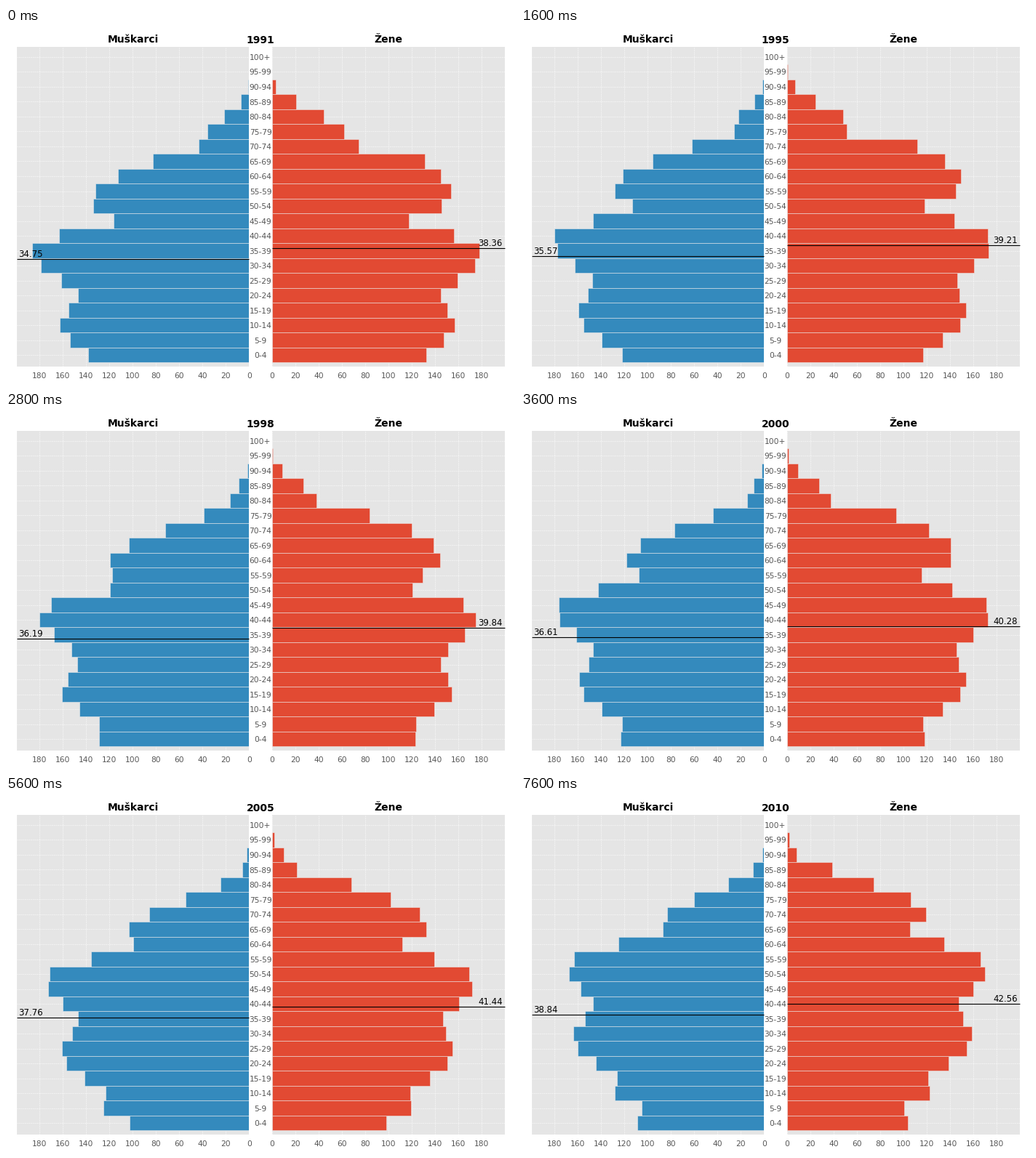
These frames come from a looping animation (700 px wide and 490 px high, 8000 ms). A matplotlib script:

```python
import matplotlib.pyplot as plt
import numpy as np
from matplotlib.animation import FuncAnimation
from matplotlib.patches import Rectangle

WIDTH, HEIGHT, DPI = 700, 490, 100
FIRST_YEAR, YEAR_COUNT, INTERVAL = 1991, 20, 400
TOP, BOTTOM, SPAN = 26, 466, 319.7
BASE, ROW, GROUPS = 460.25, 20.5, 21   # lower edge of the youngest group, group height
UNIT = 1.6                             # pixels per thousand people
THIN = 0.36
LABEL_COLOR = "#555555"

# Size of a birth cohort in pixels: turning points of the birth curve.
BIRTHS = np.array([
    (1893, 10), (1898.5, 49), (1903.5, 122), (1912, 166), (1917, 112), (1920.5, 203),
    (1923.5, 240), (1933, 259), (1938.5, 239), (1943, 188), (1945.5, 198),
    (1949, 259), (1954, 286), (1958.5, 276), (1968.5, 229), (1980, 250),
    (1988.5, 209), (1992.5, 187), (1996, 199), (2002.5, 155), (2007.5, 160),
])
MEAN_AGE_YEARS = [1991, 1993, 1996, 2000, 2003, 2008, 2010]
MEN_AGES = [34.75, 35.20, 35.76, 36.61, 37.32, 38.43, 38.84]
WOMEN_AGES = [38.36, 38.81, 39.41, 40.28, 40.98, 42.14, 42.56]

AGES = 5 * np.arange(GROUPS) + 2.5


def bump(x, center, width):
    return np.exp(-((x - center) / width) ** 2 / 2)


def survival(age, scale, rate):
    """Gompertz survival; the hazard integral reaches 1 at age `scale`."""
    return np.exp(-np.exp(rate * (age - scale)))


def cohorts(year):
    """Cohort sizes by age group, with migration felt by the young."""
    young = 1 / (1 + np.exp((AGES - 42) / 4))
    migration = 1 + 0.00028 * (year - 1998) ** 2 * young
    return np.interp(year - AGES, *BIRTHS.T) * migration


def women(year):
    return cohorts(year) * survival(AGES, 85.2, 0.113)


def men(year):
    born = year - AGES
    ratio = (1.045 - 0.28 * bump(born, 1921, 5) - 0.10 * bump(born, 1934, 6)
             + 0.03 * bump(born, 1950, 4) - 0.03 * bump(born, 1966, 6))
    return cohorts(year) * ratio * survival(AGES, 78.5, 0.098)


fig = plt.figure(figsize=(WIDTH / DPI, HEIGHT / DPI), dpi=DPI, facecolor="white")
stage = fig.add_axes([0, 0, 1, 1])
stage.set_xlim(0, WIDTH)
stage.set_ylim(HEIGHT, 0)
stage.axis("off")


def label(x, y, text, size=7.7, color=LABEL_COLOR, align="center", **style):
    return stage.text(x, y, text, size=size, color=color, ha=align, va="baseline",
                      family="DejaVu Sans", **style)


class Panel:
    """One half of the pyramid, growing from `origin` in direction `sign`."""

    def __init__(self, title, origin, sign, color, lengths, ages):
        self.sign, self.lengths, self.ages = sign, lengths, ages
        end = origin + sign * SPAN
        left, right = sorted((origin, end))
        area = Rectangle((left, TOP), SPAN, BOTTOM - TOP, fc="#E5E5E5", lw=0, zorder=0)
        stage.add_patch(area)
        label((left + right) / 2 + 0.3, 20, title, 10, "black", weight="bold")

        grid = dict(color="white", lw=THIN, ls="--", zorder=1)
        for value in range(0, 200, 20):
            x = origin + sign * UNIT * value
            stage.plot([x, x], [BOTTOM, TOP], **grid)
            label(x, 482, str(value))

        self.bars = []
        for row in range(GROUPS):
            y = BASE - ROW * (row + 0.5)
            stage.plot([left, right], [y, y], **grid)
            bar = Rectangle((origin, y - ROW / 2), 0, ROW,
                            fc=color, ec="#EEEEEE", lw=THIN, zorder=2)
            stage.add_patch(bar)
            bar.set_clip_path(area)
            self.bars.append(bar)

        self.line, = stage.plot([left, right], [0, 0], color="black", lw=0.8,
                                solid_capstyle="butt", zorder=3)
        self.note = label(end - sign * 2.8, 0, "", 8.5, "black",
                          "left" if sign < 0 else "right", zorder=4)

    def update(self, year):
        for bar, length in zip(self.bars, self.lengths(year)):
            bar.set_width(self.sign * length)
        age = np.interp(year, MEAN_AGE_YEARS, self.ages)
        y = BASE - ROW * age / 5
        self.line.set_ydata([y, y])
        self.note.set_y(y - 3)
        self.note.set_text(f"{age:.2f}")


panels = [
    Panel("Muškarci", 334.3, -1, "#348ABD", men, MEN_AGES),
    Panel("Žene", 366, 1, "#E24A33", women, WOMEN_AGES),
]
for row in range(GROUPS):
    group = "100+" if row == GROUPS - 1 else f"{5 * row}-{5 * row + 4}"
    label(350, BASE - ROW * (row + 0.5) + 4, group)
year_label = label(350, 21, "", 10, "black", weight="bold")


def update(frame):
    year = FIRST_YEAR + frame
    year_label.set_text(str(year))
    for panel in panels:
        panel.update(year)
    return []


animation = FuncAnimation(fig, update, frames=YEAR_COUNT, interval=INTERVAL,
                          repeat=True, repeat_delay=0, blit=False)
plt.show()
```
